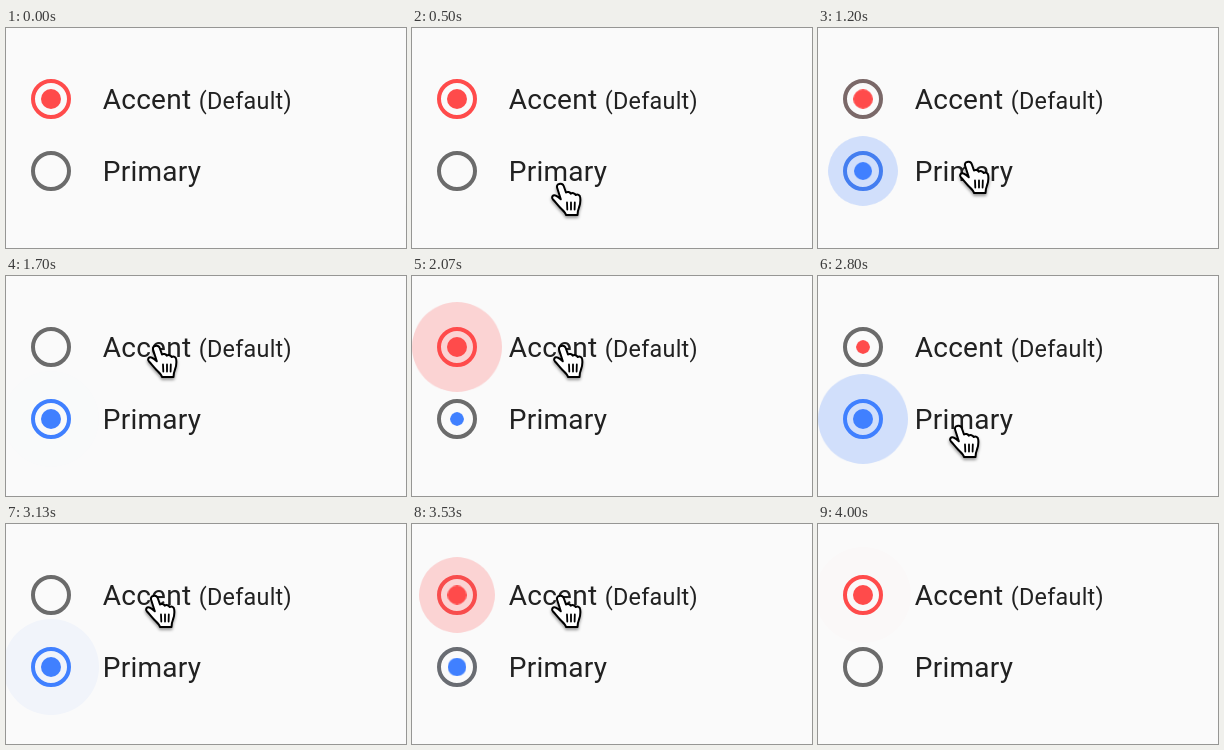
These frames come from a looping animation (400x220 px, 4030 ms). An HTML page:

```html
<!DOCTYPE html>
<html lang="en">
<head>
<meta charset="utf-8">
<title>Radio buttons</title>
<style>
  :root { --red: #ff4b4b; --blue: #4080ff; --gray: #6b6b6b; }
  html, body { margin: 0; width: 100%; height: 100%; overflow: hidden; background: #fafafa; }
  svg { display: block; width: 400px; height: 220px; }
  text { font: 28px Roboto, sans-serif; letter-spacing: .28px; fill: #212121; }
  .small { font-size: 23.33px; }

  .accent { --color: var(--red); }
  .primary { --color: var(--blue); }
  .ring { fill: none; stroke-width: 4; }
  .dot, .ripple { fill: var(--color); }

  .ring, .dot, .ripple, .hand { animation: 4030ms ease infinite; }
  .accent .ring { animation-name: accent-ring; }
  .accent .dot { animation-name: accent-dot; }
  .accent .ripple { animation-name: accent-grow, accent-fade; }
  .primary .ring { animation-name: primary-ring; }
  .primary .dot { animation-name: primary-dot; }
  .primary .ripple { animation-name: primary-grow, primary-fade; }
  .ripple { animation-timing-function: cubic-bezier(0, 0, .2, 1), linear; }
  .hand { animation-name: hand; animation-timing-function: ease-in-out; filter: drop-shadow(0 2px 1.5px rgba(0, 0, 0, .4)); }

  /* clicks: primary 27.05%, accent 46.4%, primary 64.52%, accent 84.37% */
  @keyframes accent-ring {
    0%, 27.05%, 50.87%, 64.52%, 88.84%, 100% { stroke: var(--red); }
    31.52%, 46.4%, 68.99%, 84.37% { stroke: var(--gray); }
  }
  @keyframes primary-ring {
    0%, 27.05%, 50.87%, 64.52%, 88.84%, 100% { stroke: var(--gray); }
    31.52%, 46.4%, 68.99%, 84.37% { stroke: var(--blue); }
  }
  @keyframes accent-dot {
    0%, 50.87%, 88.84%, 100% { transform: scale(1); }
    29.04%, 66.51% { transform: scale(1); animation-timing-function: ease-in; }
    35%, 46.4%, 72.46%, 84.37% { transform: scale(0); }
  }
  @keyframes primary-dot {
    0%, 27.05%, 54.34%, 64.52%, 92.31%, 100% { transform: scale(0); }
    31.52%, 68.99% { transform: scale(1); }
    48.39%, 86.36% { transform: scale(1); animation-timing-function: ease-in; }
  }
  @keyframes accent-grow {
    0%, 46.4%, 84.37% { transform: scale(0); }
    53.84%, 84.36%, 91.81%, 100% { transform: scale(1); }
  }
  @keyframes primary-grow {
    0%, 27.05%, 64.52% { transform: scale(0); }
    34.49%, 64.51%, 71.96%, 100% { transform: scale(1); }
  }
  @keyframes accent-fade {
    0%, 46.4%, 61.78%, 84.37%, 99.75%, 100% { opacity: 0; }
    47.89%, 51.86%, 85.86%, 89.83% { opacity: .22; }
  }
  @keyframes primary-fade {
    0%, 27.05%, 42.43%, 64.52%, 79.9%, 100% { opacity: 0; }
    28.54%, 32.51%, 66.01%, 69.98% { opacity: .22; }
  }
  @keyframes hand {
    0%, 4.7% { transform: translate(402px, 163px); animation-timing-function: ease-out; }
    12.3%, 26.55% { transform: translate(139px, 155px); }
    29.03%, 39.4% { transform: translate(141px, 133px); }
    41.9%, 57.8% { transform: translate(141px, 69px); }
    61%, 74.4% { transform: translate(131px, 149px); }
    77.2% { transform: translate(139px, 71px); }
    88.3% { transform: translate(139px, 71px); animation-timing-function: ease-in; }
    90.31% { transform: translate(280px, 58px); visibility: visible; }
    90.32%, 100% { transform: translate(402px, 50px); visibility: hidden; }
  }
</style>
</head>
<body>
<svg viewBox="0 0 400 220">
  <g class="accent" transform="translate(45 71)">
    <circle class="ripple" r="48"/>
    <circle class="ring" r="18"/>
    <circle class="dot" r="10"/>
  </g>
  <g class="primary" transform="translate(45 143)">
    <circle class="ripple" r="48"/>
    <circle class="ring" r="18"/>
    <circle class="dot" r="10"/>
  </g>
  <text x="96.7" y="81">Accent <tspan class="small">(Default)</tspan></text>
  <text x="96.7" y="153">Primary</text>
  <g class="hand" stroke="#000" stroke-linecap="round" stroke-linejoin="round">
    <path fill="#fff" stroke-width="2" d="M8 1C10 .3 12 1 12.7 3L15 9.5C16.5 8.5 19 9 19.7 10.7C21 9.5 24 10 24.6 12C26.5 11 29 12 29.2 14.5C29.6 18 29.5 21 28 24.5C27 27 26.5 29 26.5 32L15 32C14.5 29.5 12 27.5 9.5 25C6.5 22 4 18.5 2 16.5C0 14 2 11.5 4.5 12.5C6.5 13.2 8 14.5 9.8 16.2L6.2 5C5.6 3 6.3 1.5 8 1Z"/>
    <path fill="none" stroke-width="1.8" d="M16 19.5l.3 7M20 19.5v7M23.8 19.5l-.2 7"/>
  </g>
</svg>
</body>
</html>
```
